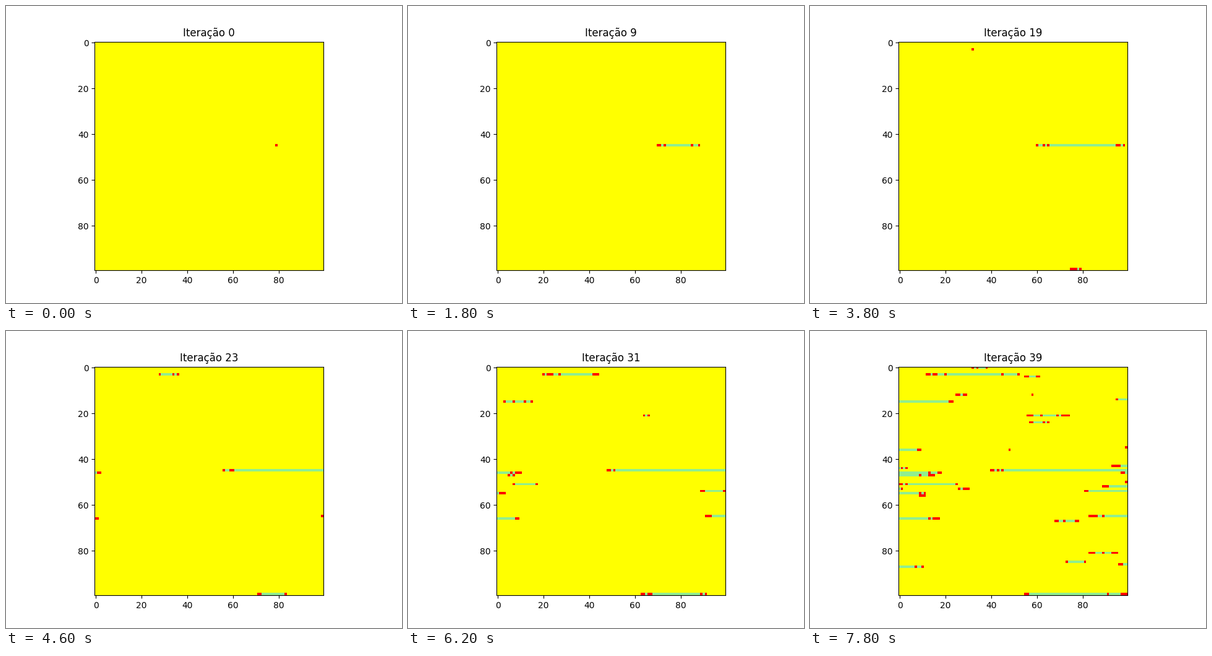
Write a matplotlib script that moves like this. It is 640 px wide and 480 px high and loops after 8000 ms.

```python
import numpy as np
import matplotlib.pyplot as plt
from matplotlib.animation import FuncAnimation
from matplotlib.colors import ListedColormap

SIZE = 100
STEPS = 40
RECOVERY_RATE = 0.4
HEALTHY, INFECTED, RECOVERED = range(3)

# Outbreaks: starting step and cell (row * SIZE + column).
OUTBREAKS = [
    (0, 4579), (17, 9977), (19, 332), (22, 6600), (24, 5496), (25, 1509),
    (26, 5112), (30, 2165), (30, 4706), (32, 8703), (33, 5295), (33, 8189),
    (34, 3604), (34, 4398), (34, 6773), (35, 2461), (35, 8577), (36, 35),
    (36, 458), (37, 1227), (37, 5328), (38, 5610), (39, 1258), (39, 3648),
]

# The infection spreads one cell per step both ways along the flattened grid,
# so it runs on from the end of a row to the start of the next.
cells = np.arange(SIZE * SIZE)
caught = np.min([start + abs(cells - seed) for start, seed in OUTBREAKS],
                axis=0)

# Each infected cell has the same chance of recovering at every step.
rng = np.random.default_rng(7)
healed = caught + rng.geometric(RECOVERY_RATE, cells.size)


def grid_at(step):
    state = np.full(cells.size, HEALTHY)
    state[caught <= step] = INFECTED
    state[healed <= step] = RECOVERED
    return state.reshape(SIZE, SIZE)


fig, ax = plt.subplots(figsize=(6.4, 4.8), dpi=100)
image = ax.imshow(grid_at(0), vmin=HEALTHY, vmax=RECOVERED,
                  cmap=ListedColormap(["yellow", "red", "lightgreen"]))
title = ax.set_title("Iteração 0")


def update(step):
    image.set_data(grid_at(step))
    title.set_text(f"Iteração {step}")
    return image, title


anim = FuncAnimation(fig, update, frames=STEPS, interval=200, repeat=True)
plt.show()
```
